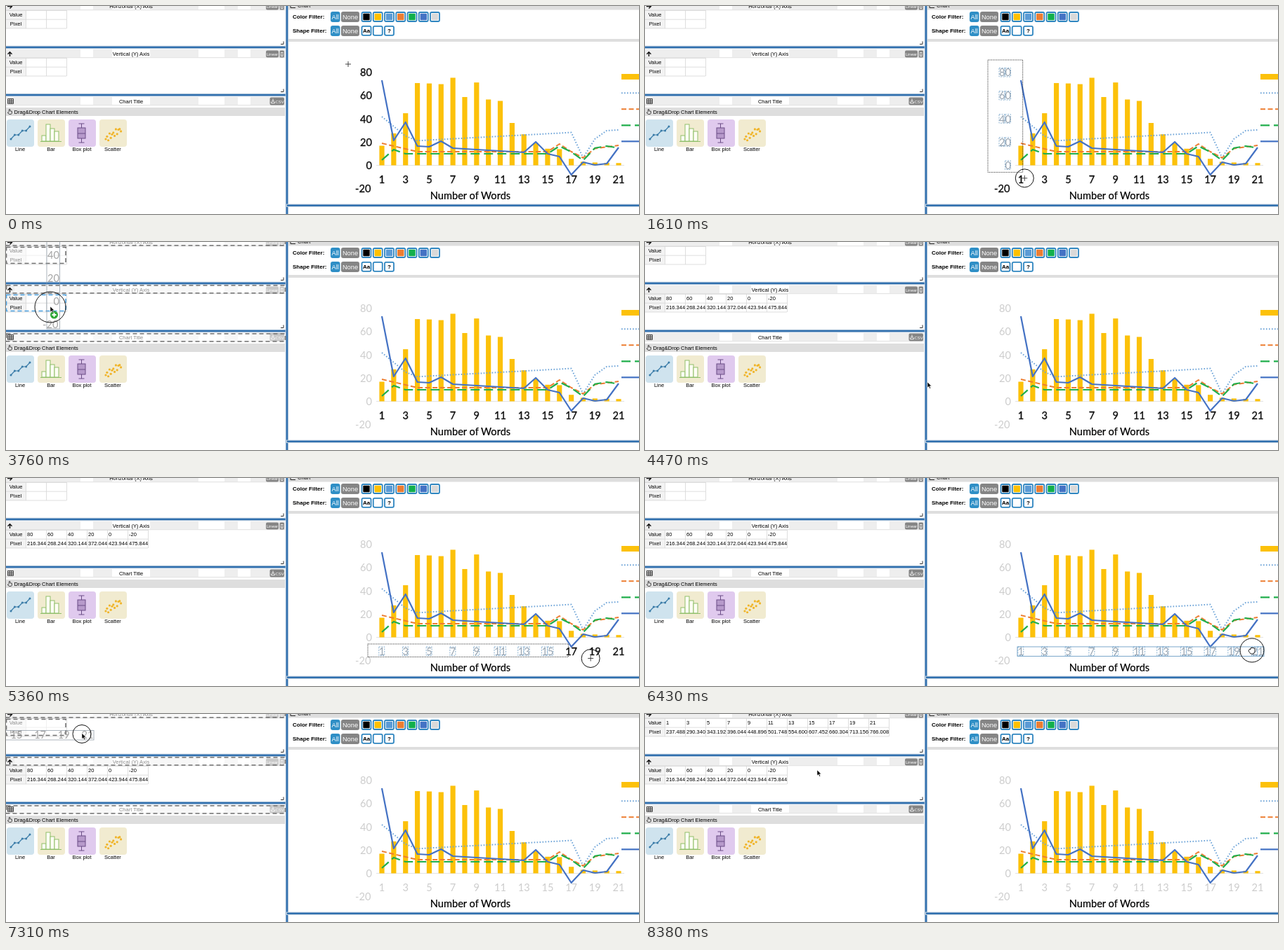
An HTML page for the animation above (8.48 s loop, 901x297 px).

```html
<!DOCTYPE html>
<html lang="en">
<head>
<meta charset="utf-8">
<title>Chart axis drag and drop</title>
<style>
html, body { margin: 0; width: 100%; height: 100%; overflow: hidden; background: #fff; }
svg { display: block; width: 901px; height: 297px; font: 7.5px "Liberation Sans", Arial, sans-serif; }
.tick { font: 14.6px Lato, "Open Sans", sans-serif; }
.strong { stroke: #111; stroke-width: .35px; }
.axis { font: 14.6px Lato, "Open Sans", sans-serif; stroke: #000; stroke-width: .2px; }
</style>
</head>
<body>
<svg viewBox="0 0 901 297"><g id="base"></g><g id="live"></g></svg>
<script>
const LOOP = 8480, STEP = 178.1;

const rect = (x, y, w, h, fill, more = '') =>
  `<rect x="${x}" y="${y}" width="${w}" height="${h}" fill="${fill}" ${more}/>`;
const text = (s, x, y, more = '') => `<text x="${x}" y="${y}" ${more}>${s}</text>`;
const path = (d, stroke, width = 1, more = '') =>
  `<path d="${d}" fill="none" stroke="${stroke}" stroke-width="${width}" ${more}/>`;
const move = (x, y, body, more = '') => `<g transform="translate(${x} ${y})" ${more}>${body}</g>`;
const list = (n, make) => Array.from({ length: n }, (_, i) => make(i));
const join = (n, make) => list(n, make).join('');
const mid = 'text-anchor="middle"';

// ---------- Left column ----------
function header(y) {
  return rect(0, y, 397, 12, '#eee') + rect(0, y + 11.5, 397, .7, '#ddd') +
    [[106, 18], [151, 54], [274, 37], [330, 18]].map(([x, w]) => rect(x, y, w, 11, '#fff')).join('');
}

function axisPanel(title, arrow) {
  return header(62) + path(arrow, '#111', 1.4) + text(title, 178, 70.7, mid) +
    rect(370, 63.5, 18, 10, '#858585', 'rx="2"') +
    text('Linear', 379, 70.8, mid + ' fill="#fff" font-size="6"') +
    rect(389.5, 63.5, 6.5, 10, '#858585', 'rx="1.5"') +
    path('M391 66.5h3.6M391.6 67.5v4h2.4v-4', '#fff', .8) +
    path('M391 122.5h4v-4', '#333');
}

function tile(i, fill, label, icon) {
  const x = 1 + 44 * i;
  return rect(x, 162, 39, 39, fill, 'rx="4"') + move(x, 162, icon) + text(label, x + 19, 207.3, mid);
}

function tiles() {
  const dot = (x, y, r, c) => `<circle cx="${x}" cy="${y}" r="${r}" fill="${c}"/>`;
  const trend = list(6, i => [6 + 5.4 * i, 28 - 3 * i - 3 * (i % 2)]);
  const noise = i => Math.sin(i * 91.7) * 4.5;
  return tile(0, '#cfe3ee', 'Line', path('M' + trend.join('L'), '#3a7ca8', 1.2) +
      trend.map(([x, y]) => dot(x, y, 1.5, '#3a7ca8')).join('')) +
    tile(1, '#f1ebd0', 'Bar', [8, 24, 18, 14].map((h, i) =>
      rect(6 + 6 * i, 31 - h, 6, h, '#fffdf4', 'stroke="#8fbf6a"')).join('') + path('M4 31.5h30', '#8fbf6a')) +
    tile(2, '#e0caee', 'Box plot', rect(13, 12, 11, 15, '#b79acb', 'stroke="#6b4d86"') +
      path('M18.5 6v6M18.5 27v6M14.5 6h8M14.5 33h8M13 20h11', '#6b4d86')) +
    tile(3, '#f1ebd0', 'Scatter', join(13, i => dot(9 + 1.8 * i, 28 - 1.2 * i + noise(i), 1.6, '#f0b429')));
}

function leftColumn() {
  return move(0, -68, axisPanel('Horizontal (X) Axis', 'M2 68.5h6M5.5 65.5l3 3l-3 3')) +
    axisPanel('Vertical (Y) Axis', 'M5.5 72v-6M2.5 68.7l3-3l3 3') +
    header(130) + text('Chart Title', 178, 138.7, mid) +
    path('M2.5 132.5h8v7h-8zM2.5 135h8M2.5 137.3h8M5.2 132.5v7M7.9 132.5v7', '#333', .9) +
    rect(375.5, 130.5, 20.5, 11, '#858585', 'rx="2"') +
    path('M380 132.5v4M378.4 135l1.6 1.7l1.6-1.7M377.5 136.5v2.2h5v-2.2', '#fff', .9) +
    text('CSV', 383.5, 138.7, 'fill="#fff" font-size="6"') +
    rect(0, 145, 397, 12, '#dedede') + text('Drag&amp;Drop Chart Elements', 11.5, 153.8) +
    path('M4.3 151v-3.2q.8-1 1.6 0v2l2.4.7v2.5l-1 1.5h-3l-2-2.3q.2-1 2 0', '#222', .8) + tiles();
}

// ---------- Right column ----------
const colors = ['#000', '#ffc000', '#5b9bd5', '#ed7d31', '#12b04c', '#4472c4', '#d9d9d9'];
const COUNT = 21;
const slot = i => 535 + 16.85 * i;

// Sum of triangular peaks: [centre, height, half width].
const peaks = (i, all) => all.reduce((sum, [c, h, w = 1]) => sum + h * Math.max(0, 1 - Math.abs(i - c) / w), 0);

const barHeight = i => Math.min(28 * 1.63 ** i,
  3 + 115 / (1 + Math.exp((i - 11) / 1.5)) + peaks(i, [[6, 11], [7, -13], [8, 14], [10, 13], [14, 7, 3], [15, 8]]));

const series = [
  { color: '#6ea4d8', width: 2, dash: '1.6 2.4', y: i => 195 - .9 * i + peaks(i, [[0, -37, 2.5], [17, 37], [18, 11]]) },
  { color: '#ed7d31', width: 2, dash: '7 3.5', y: i => 208 + peaks(i, [[0, -12, 3], [15, -11], [17, 11], [20, -9, 4]]) },
  { color: '#1fae4b', width: 2.2, dash: '13 6', y: i => 211 + peaks(i, [[0, 9], [1, -6], [15, -11], [17, 15], [19, -11, 4]]) },
  { color: '#4472c4', width: 2.2, dash: '', y: i => 197 + i +
      peaks(i, [[0, -91], [1, -6], [2, -33], [5, -9], [13, -16], [16, 22], [18, 12, 4], [20, -21]]) }
];

function button(label, x, y, w, fill) {
  return rect(x, y, w, 15, fill, 'rx="3"') + text(label, x + w / 2, y + 11, mid + ' fill="#fff" font-size="9.3"');
}

function filterRow(label, y) {
  return text(label, 408, y + 10, 'font-size="8" font-weight="bold"') +
    button('All', 462, y, 13.5, '#2f8fc6') + button('None', 477, y, 26, '#858585');
}

function chip(i, y, inner, label = '') {
  const x = 513 + 16.25 * i;
  return rect(x - 6.5, y - 6.5, 13, 13, '#fff', 'rx="2" stroke="#2f86c0" stroke-width="1.8"') +
    rect(x - 4.7, y - 4.7, 9.4, 9.4, inner, 'rx="1"') +
    text(label, x, y + 2.9, mid + ' font-size="8" font-weight="bold"');
}

function toolbar() {
  return rect(402, 0, 499, 5.5, '#dedede') + text('Chart', 415, 2.3) + path('M405 0v2.5h7', '#222') +
    filterRow('Color Filter:', 8) + filterRow('Shape Filter:', 28) +
    colors.map((c, i) => chip(i, 15.5, c)).join('') +
    ['Aa', '', '?'].map((s, i) => chip(i, 35.3, '#fff', s)).join('') +
    rect(402, 47, 499, 4, '#dedede');
}

function chart() {
  const bar = i => rect(slot(i) - 3.6, 227.5 - barHeight(i), 7.2, barHeight(i), '#fcc10a');
  const line = ({ color, width, dash, y }, row) =>
    path('M' + list(COUNT, i => [slot(i), y(i)]).join('L'), color, width,
      `stroke-dasharray="${dash}" stroke-linejoin="round"`) +
    path(`M876 ${124.3 + 23 * row}h25`, color, width, `stroke-dasharray="${dash}"`);
  return path('M527 227.5H880', '#dcdcdc', .8) + join(COUNT, bar) + series.map(line).join('') +
    rect(876, 97, 25, 8, '#fcc10a') + text('Number of Words', 661, 275.5, mid + ' class="axis"');
}

function dividers() {
  const bar = (x, y, w, h) => rect(x - 1, y - 1, w + 2, h + 2, '#c3d2e0') + rect(x, y, w, h, '#2f6fae');
  return bar(0, 57.7, 398, 2.5) + bar(0, 125.8, 398, 2.5) + bar(398.7, 0, 2.5, 297) + bar(400, 283.6, 501, 2.4);
}

document.getElementById('base').innerHTML = leftColumn() + toolbar() + chart() + dividers();

// ---------- Moving parts ----------
const label = (v, x, y) => ({ s: String(v), x, y });
const ramp = (n, first, gap) => list(n, i => (first + gap * i).toFixed(3));

// Each axis: lasso, then pick up the labels, then drop them on a table.
const axes = [
  { press: 3, release: 11, grab: 15, drop: 21, top: 74, frame: [503, 88, 18.5, 179],
    labels: list(6, i => label(80 - 20 * i, 521 - 4.25 * String(80 - 20 * i).length, 95 + 33.1 * i)),
    pixels: ramp(6, 216.344, 51.9) },
  { press: 27, release: 32, grab: 36, drop: 42, top: 6, frame: [530, 241, 351, 13.5],
    labels: list(11, i => label(2 * i + 1, slot(2 * i), 247.5)),
    pixels: ramp(11, 237.488, 52.852) }
];

// Cursor stops: [arrive, leave, x, y], with times in steps.
const stops = [
  [0, 0, 487, 83], [2, 3, 488, 77], [10, 12, 549, 274], [14, 15, 508, 236], [21, 22, 63, 93],
  [26, 27, 515, 237], [30.5, 33, 885, 261], [35, 36, 864, 246], [41, 42, 108, 28.5], [46, 48, 245, 81]
];

function cursorAt(k) {
  const i = stops.findIndex(s => k <= s[1]);
  const [arrive, , x, y] = stops[i];
  if (k >= arrive) return [x, y];
  const [, leave, x0, y0] = stops[i - 1];
  const f = (k - leave) / (arrive - leave);
  return [x0 + (x - x0) * f, y0 + (y - y0) * f];
}

const tick = ({ s, x, y }, fill, style = '') => text(s, x, y + 5.3, `${mid} class="tick ${style}" fill="${fill}"`);

function picked(l) {
  const n = l.s.length;
  return tick(l, '#98a5b2') + join(n, i => rect(l.x + (i - n / 2) * 8.5, l.y - 6.5, 8, 12.5, 'none',
    'stroke="#6f9fc6" stroke-width=".8" stroke-dasharray="2 1.5"'));
}

function axisLabels(a, k, lasso) {
  return a.labels.map(l => {
    if (k > a.grab) return tick(l, '#cdcdcd');
    const inside = lasso ? l.x < lasso[0] && l.y < lasso[1] : k > a.release;
    return inside ? picked(l) : tick(l, '#111', 'strong');
  }).join('');
}

const frameBox = ([x, y, w, h], color) => rect(x, y, w, h, 'none', `stroke="${color}" stroke-width=".9"`);

function table(a, k) {
  const full = k > a.drop, n = full ? a.labels.length : 2, y = a.top, w = 28 + 29 * n;
  const row = (name, vals, dy) => text(name, 14, y + dy, mid) +
    (full ? vals.map((v, i) => text(v, 30 + 29 * i, y + dy)).join('') : '');
  return rect(0, y, 28, 26, '#f3f3f3') +
    path(`M0 ${y + .5}h${w}M0 ${y + 13.2}h${w}M0 ${y + 26}h${w}` + join(n + 1, i => `M${28.5 + 29 * i} ${y}v26`), '#d6d6d6', .8) +
    row('Value', a.labels.map(l => l.s), 8.7) + row('Pixel', a.pixels, 21.7);
}

function zone(y, w, h, hot, inset = 0) {
  return (hot ? '' : rect(inset, y, w - inset, h, '#fff', 'opacity=".55"')) +
    rect(.5, y, w, h, 'none', `stroke="${hot ? '#4aa0e0' : '#707070'}" stroke-width="1.6" stroke-dasharray="6 4"`);
}

function dragging(a, k, cx, cy) {
  const over = t => t == a && cx < 85 && cy > a.top && cy < a.top + 26;
  const [gx, gy] = cursorAt(a.grab);
  const ghost = a.labels.map(l => tick(l, '#8f8f8f')).join('') + frameBox(a.frame, '#8a97a3');
  const plus = '<circle r="5.5" fill="#2fa836"/>' + path('M-3 0h6M0-3v6', '#fff', 1.8);
  return [-6, 62, 131].map(y => zone(y, 397, 11, false, 12)).join('') +
    axes.map(t => k > t.drop ? '' : zone(t.top + 1.5, 84.5, 23, over(t))).join('') +
    move(cx - gx, cy - gy, ghost, 'opacity=".8"') + (over(a) ? move(cx + 5.5, cy + 11, plus) : '');
}

const pointers = {
  cross: path('M-4 0h8M0-4v8', '#333', .9),
  hand: '<path d="M-4-1q1-2 2 0v-2q1-2 2 0q1-2 2 0q1-1 2 1v4l-2 3h-4l-3-4z" fill="#fff" stroke="#111" stroke-width=".9"/>',
  arrow: '<path d="M0-1v8l1.9-1.7l1.4 3l1.3-.6l-1.4-2.9h2.6z" fill="#000" stroke="#fff" stroke-width=".5"/>'
};

function draw(k) {
  const [cx, cy] = cursorAt(k);
  let labels = '', top = '', ring = 0, kind = cx > 402 ? 'cross' : 'arrow';
  for (const a of axes) {
    // The lasso trails slightly behind the cursor.
    const lasso = k >= a.press && k <= a.release && cursorAt(Math.max(a.press, k - .3));
    labels += axisLabels(a, k, lasso);
    if (lasso) {
      const [x, y] = cursorAt(a.press);
      top += rect(x, y, Math.max(0, lasso[0] - x), lasso[1] - y, 'none', 'stroke="#222" stroke-width=".9" stroke-dasharray="1.2 1.2"');
    }
    if (k >= a.grab - 1 && k <= a.grab) {
      kind = 'hand';
      top += frameBox(a.frame, '#6f9fc6');
    }
    if (k > a.grab && k <= a.drop) {
      kind = 'arrow';
      top += dragging(a, k, cx, cy);
    }
    for (const [down, up] of [[a.press, a.release], [a.grab, a.drop]])
      if (k >= down && k <= up) ring = k == down ? 17 : k == up ? 22 : 13;
  }
  const halo = ring ? `<circle r="${ring}" fill="none" stroke="#111"/>` : '';
  return labels + axes.map(a => table(a, k)).join('') + top + move(cx, cy, halo + pointers[kind]);
}

const live = document.getElementById('live');
const start = performance.now();
let shown = -1;
function play() {
  const k = Math.floor((performance.now() - start) % LOOP / STEP);
  if (k != shown) live.innerHTML = draw(shown = k);
  requestAnimationFrame(play);
}
play();
</script>
</body>
</html>
```
